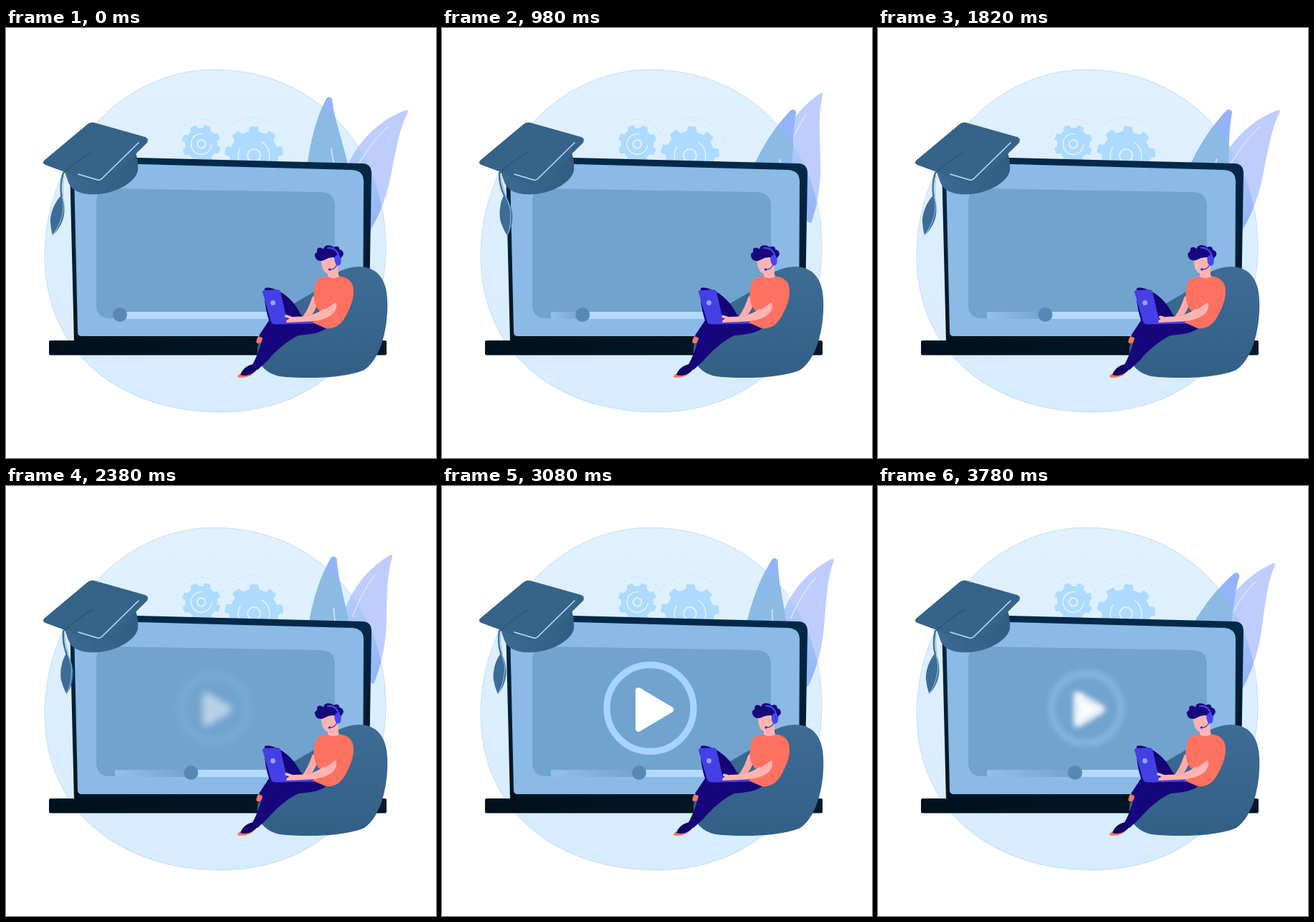
Recreate the animation shown at these times as an HTML page with a canvas. Size 600 by 600 pixels, loop 3920 ms.

```html
<!DOCTYPE html>
<html lang="en">
<head>
<meta charset="utf-8">
<title>Online learning</title>
<style>
html, body { margin: 0; width: 100%; height: 100%; overflow: hidden; background: #fff; }
canvas { display: block; width: 600px; height: 600px; }
</style>
</head>
<body>
<canvas id="stage" width="600" height="600"></canvas>
<script>
const ctx = document.getElementById('stage').getContext('2d');
const LOOP = 3920, STEP = 140, TAU = Math.PI * 2;
const clamp = (v, lo = 0, hi = 1) => Math.min(hi, Math.max(lo, v));

const shape = {
  disc: 'M290 58C430 58 530 164 530 306C530 440 436 536 300 536C156 536 54 451 54 318C54 178 160 58 290 58Z',
  leftLeaf: 'M447 98Q451 94 455 99C457 122 467 150 477 190L484 240L418 240C417 190 428 135 447 98Z',
  rightLeaf: 'M559 114Q562 115 560 119C548 142 543 178 537 206C531 236 522 260 505 288L462 262C463 232 472 197 484 178C500 149 527 126 559 114Z',
  frame: 'M89 193Q89 181 102 181L184 181L497 189Q510 189 510 203L506 438L95 438Z',
  display: 'M95 202Q95 188 109 188L186 190L483 198Q499 199 499 214L498 430L106 430Q100 430 100 424Z',
  panel: 'M126 243Q126 224 145 224L440 229Q459 230 459 249L459 405L145 405Q126 405 126 386Z',
  capBase: 'M81 198L87 215C92 229 108 233 128 232C156 230 181 214 184 199Q185 186 181 174Z',
  board: 'M53 185L114 134Q118 131 123 132L194 152Q200 154 197 160L139 217Q133 222 126 219L82 201L55 191Q50 189 53 185Z',
  tassel: 'M82 233C74 243 70 258 71 270Q74 285 77 290C83 284 89 272 89 258Q88 242 82 233Z',
  bag: 'M352 440C347 464 358 481 382 486C416 490 474 489 500 477C525 460 534 412 532 378C531 348 515 333 493 333C463 334 447 351 430 368C406 383 360 402 352 440Z',
  backLeg: 'M361 363Q366 361 376 365C391 371 403 383 411 399L425 413L377 413C371 422 364 430 360 434L353 429L367 408C361 390 360 373 361 363Z',
  frontLeg: 'M428 409L449 417C442 425 425 428 408 429C391 437 376 451 365 464L351 477L343 471C350 459 353 450 357 436C362 421 369 413 382 412Z',
  shoe: 'M327 484C330 475 338 470 346 469L352 474C346 483 336 487 327 484Z',
  sole: 'M323 487Q323 483 330 481Q338 485 348 478Q343 488 326 488Z',
  backFoot: 'M352 430L361 434Q358 440 350 440Q348 437 352 430Z',
  lid: 'M358 369Q357 366 361 366L379 365Q382 365 383 368L393 411L376 413Q372 414 370 410Z',
  shirt: 'M436 350C447 345 471 344 478 351C491 361 484 385 474 402C468 414 457 421 446 419L428 411L438 395C431 389 428 377 430 364Q431 355 436 350Z',
  farArm: 'M432 371L436 377Q434 391 427 400L414 403Q423 390 427 376Z',
  nearArm: 'M447 388L459 380Q464 389 457 398C448 407 430 410 414 410L391 411L392 407L402 403C421 403 437 399 447 388Z',
  sleeve: 'M438 352C449 355 458 370 461 382L445 393C434 384 430 363 438 352Z',
  face: 'M439 323L463 319L463 334L464 345Q457 350 449 347L449 343Q443 341 441 333Z',
  hair: 'M431 318C430 313 435 315 434 310C434 305 441 306 443 309C443 302 454 302 457 306C462 303 466 306 465 309C471 310 473 316 468 320L464 329L458 320C448 319 446 325 438 325Q432 324 431 318Z'
};
for (const key in shape) shape[key] = new Path2D(shape[key]);

function vertical(y0, y1, from, to) {
  const g = ctx.createLinearGradient(0, y0, 0, y1);
  g.addColorStop(0, from);
  g.addColorStop(1, to);
  return g;
}

function horizontal(x0, x1, from, to) {
  const g = ctx.createLinearGradient(x0, 0, x1, 0);
  g.addColorStop(0, from);
  g.addColorStop(1, to);
  return g;
}

function fill(path, color) {
  ctx.fillStyle = color;
  ctx.fill(path);
}

function line(d, color, width) {
  ctx.strokeStyle = color;
  ctx.lineWidth = width;
  ctx.stroke(new Path2D(d));
}

function oval(x, y, rx, ry, angle, color) {
  ctx.beginPath();
  ctx.ellipse(x, y, rx, ry, angle, 0, TAU);
  ctx.fillStyle = color;
  ctx.fill();
}

function turned(x, y, angle, draw) {
  ctx.save();
  ctx.translate(x, y);
  ctx.rotate(angle);
  ctx.translate(-x, -y);
  draw();
  ctx.restore();
}

function arc(r, from, to, color, width) {
  ctx.beginPath();
  ctx.arc(0, 0, r, from, to);
  ctx.strokeStyle = color;
  ctx.lineWidth = width;
  ctx.stroke();
}

function gear(x, y, r, teeth, angle) {
  ctx.save();
  ctx.translate(x, y);
  ctx.setLineDash([5, 4]);
  arc(r * 1.31, -2.9, -0.3, '#cde5f8', 1);
  ctx.setLineDash([]);
  ctx.rotate(angle);
  const half = Math.PI / teeth;
  ctx.beginPath();
  for (let i = 0; i < teeth; i++) {
    const a = i * 2 * half;
    for (const [offset, k] of [[-0.54, 0.82], [-0.34, 0.99], [0.34, 0.99], [0.54, 0.82]])
      ctx.lineTo(Math.cos(a + offset * half) * r * k, Math.sin(a + offset * half) * r * k);
  }
  ctx.closePath();
  ctx.fillStyle = ctx.strokeStyle = '#addaff';
  ctx.lineWidth = 2;
  ctx.lineJoin = 'round';
  ctx.fill();
  ctx.stroke();
  arc(r * 0.54, 0.5, 5.2, '#e1f2ff', 1.6);
  arc(r * 0.22, 0, TAU, '#e1f2ff', 2);
  ctx.restore();
}

// A leaf is tinted differently where it lies over the disc.
function leaf(path, pivotX, pivotY, angle, outside, inside, rib) {
  const paint = color => turned(pivotX, pivotY, angle, () => {
    fill(path, color);
    line(rib, '#d6e5ff', 1.6);
  });
  paint(outside);
  ctx.save();
  ctx.clip(shape.disc);
  paint(inside);
  ctx.restore();
}

function background(sway, lean) {
  fill(shape.disc, vertical(58, 536, '#e0f1ff', '#d7ecff'));
  ctx.strokeStyle = 'rgba(125,170,212,.55)';
  ctx.lineWidth = 0.6;
  ctx.stroke(shape.disc);
  gear(272.5, 162, 26.5, 8, -Math.PI / 8 + lean * 0.05);
  gear(346, 178, 40.5, 9, -Math.PI / 2 + (lean + 1) * 0.05);
  leaf(shape.rightLeaf, 440, 235, -(sway + 15) * 0.0087,
    '#becdfd', vertical(150, 270, '#b5cffb', '#94b7f5'), 'M533 138Q513 155 492 190');
  leaf(shape.leftLeaf, 414, 235, (lean + 1) * 0.205,
    '#93b4fb', '#8bbae5', 'M454 168Q455 180 460 200');
}

function laptop(knobX) {
  fill(shape.frame, vertical(185, 436, '#02294a', '#00131f'));
  ctx.beginPath();
  ctx.roundRect(60, 436, 471, 20.5, 2);
  ctx.fillStyle = horizontal(60, 531, '#00111d', '#02182a');
  ctx.fill();
  fill(shape.display, '#8abae5');
  fill(shape.panel, '#71a3cf');
  ctx.fillStyle = horizontal(152, knobX, '#93c0e9', '#71a2ce');
  ctx.fillRect(152, 396, knobX - 152, 10);
  ctx.fillStyle = '#b4d9ff';
  ctx.fillRect(knobX, 396, 380 - knobX, 10);
  oval(knobX, 400, 10, 10, 0, '#5988b2');
}

// Fades and sharpens in, rests, then shrinks away in a blur.
function playButton(frame) {
  const shown = clamp((frame - 16.5) / 3.7) * clamp((28 - frame) / 3.5);
  if (!shown) return;
  const scale = 0.75 + 0.25 * shown + (frame > 19 && frame < 23 ? 0.025 : 0);
  ctx.save();
  if (shown < 1) ctx.filter = `blur(${(1 - shown) * 6}px)`;
  ctx.translate(290.5, 310);
  ctx.scale(scale, scale);
  ctx.globalAlpha = Math.min(1, shown * 1.8);
  arc(59, 0, TAU, '#a6d4ff', 9);
  ctx.globalAlpha = Math.min(1, shown * 3.5);
  const triangle = new Path2D('M-16-24L28 2L-16 28Z');
  ctx.lineJoin = 'round';
  ctx.lineWidth = 8;
  ctx.strokeStyle = '#fff';
  ctx.stroke(triangle);
  fill(triangle, '#fff');
  ctx.restore();
}

function graduationCap(sway) {
  fill(shape.capBase, horizontal(82, 184, '#3b6a93', '#305d83'));
  fill(shape.board, '#356389');
  line('M122 172Q100 184 81 202', '#285377', 1.2);
  line('M101 204L128 212Q131 213 134 210L185 160', '#b7dcff', 1.6);
  turned(80, 202, -(sway + 3) / 88, () => {
    line('M80 202Q77 219 82 235', '#3f6e97', 2.4);
    line('M81 204Q81 220 84 235', '#8bb9e2', 1);
    fill(shape.tassel, '#3d6d97');
    line('M83 235Q89 252 86 264Q84 279 77 290', '#84b3dd', 1.2);
  });
}

function student(headTilt, handShift) {
  fill(shape.bag, vertical(333, 488, '#3d6c95', '#325f86'));
  fill(shape.backFoot, '#ff7565');
  fill(shape.backLeg, '#150477');
  fill(shape.farArm, '#ffaaa9');
  fill(shape.sole, '#ff7565');
  fill(shape.shoe, '#120464');
  fill(shape.frontLeg, '#17057d');
  fill(shape.lid, '#4540e5');
  oval(372.5, 383.5, 3.4, 3.4, 0, '#91aaf5');
  line('M377 412L430 411', '#4540e5', 3);
  turned(456, 348, headTilt, () => {
    fill(shape.face, '#ffb4b1');
    fill(shape.hair, '#17087e');
    line('M449 307Q461 306 465 319', '#4945ee', 2.2);
    oval(463, 324, 4.6, 7.5, -0.12, '#4945ee');
    line('M462 330Q459 337 452 337', '#3531c7', 1.2);
    oval(451.5, 337, 1.8, 1.8, 0, '#3531c7');
  });
  fill(shape.shirt, '#ff7161');
  oval(457, 346, 8, 3, 0, '#ffb4b1');
  fill(shape.nearArm, '#ffb4b1');
  line(`M409 407Q400 406 ${391 + handShift} ${402 + handShift / 2}`, '#ffb4b1', 4);
  fill(shape.sleeve, '#ff7161');
}

function render(now) {
  const frame = Math.floor((now % LOOP) / STEP);
  const moving = Math.max(0, frame - 1);
  const sway = -2 - 13 * Math.cos(moving * TAU / 12);
  const lean = -Math.cos(moving * TAU / 18);
  const nod = frame ? Math.max(0, Math.cos((frame - 11) * TAU / 12.5)) : 0;
  const knobX = Math.min(275, 159 + 6.2 * moving);

  ctx.fillStyle = '#fff';
  ctx.fillRect(0, 0, 600, 600);
  ctx.lineCap = 'round';
  background(sway, lean);
  laptop(knobX);
  playButton(frame);
  graduationCap(sway);
  student(nod * 0.085, 1.5 - 1.5 * Math.cos(frame * TAU / 9));
}

const start = performance.now();
function tick() {
  render(performance.now() - start);
  requestAnimationFrame(tick);
}
tick();
</script>
</body>
</html>
```
